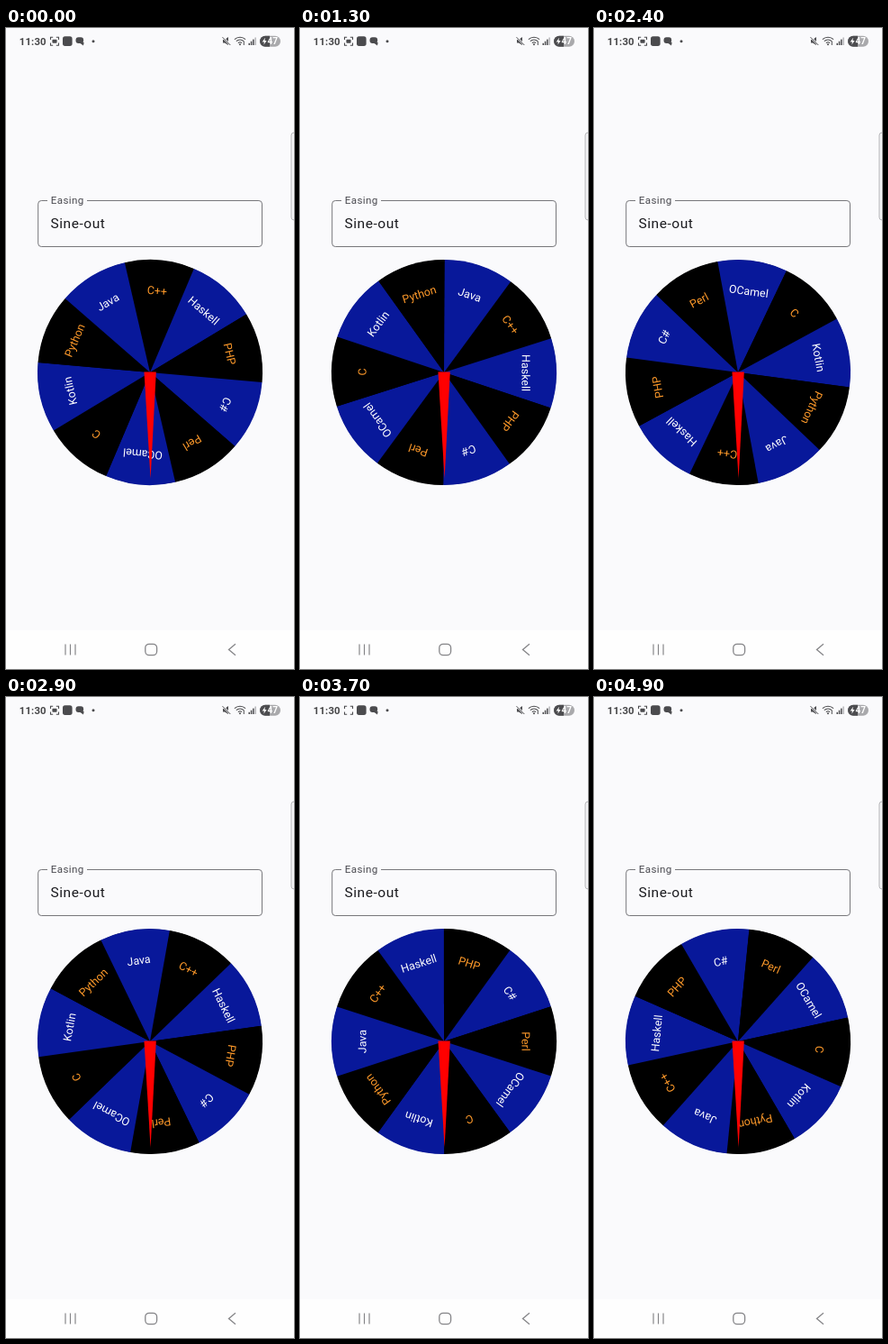
An HTML page with a canvas that plays this animation: 320 by 711 pixels, repeating every 5000 ms.

```html
<!DOCTYPE html>
<html lang="en">
<head>
<meta charset="utf-8">
<title>Spinning wheel</title>
<style>
  html, body { margin: 0; width: 100%; height: 100%; overflow: hidden; background: #fafafc; }
  canvas { display: block; width: 320px; height: 711px; }
</style>
</head>
<body>
<canvas id="stage"></canvas>
<script>
const WIDTH = 320, HEIGHT = 711, LOOP = 5000, STEP = 100;
const SPIN = { start: 447, duration: 5830, from: 5, sweep: 1797 };
const WHEEL = { x: 160, y: 382, radius: 125, labelRadius: 86.5 };
const LABELS = ['C++', 'Haskell', 'PHP', 'C#', 'Perl', 'OCamel', 'C', 'Kotlin', 'Python', 'Java'];
const ICON = '#4b4b4e', NAV = '#858588';

const canvas = document.getElementById('stage');
const ctx = canvas.getContext('2d');
const ratio = window.devicePixelRatio || 1;
canvas.width = WIDTH * ratio;
canvas.height = HEIGHT * ratio;
ctx.scale(ratio, ratio);

const radians = degrees => degrees * Math.PI / 180;

function text(value, x, y, size, color, { weight = 400, spacing = 0, align = 'left' } = {}) {
  ctx.font = `${weight} ${size}px Roboto, sans-serif`;
  ctx.letterSpacing = `${spacing}px`;
  ctx.textAlign = align;
  ctx.fillStyle = color;
  ctx.fillText(value, x, y);
}

function box(x, y, w, h, r) {
  ctx.beginPath();
  ctx.roundRect(x, y, w, h, r);
}

function fill(color) {
  ctx.fillStyle = color;
  ctx.fill();
}

function stroke(color, width = 1) {
  ctx.strokeStyle = color;
  ctx.lineWidth = width;
  ctx.stroke();
}

function path(...points) {
  ctx.beginPath();
  points.forEach(([x, y]) => ctx.lineTo(x, y));
}

function disc(x, y, r, color) {
  ctx.beginPath();
  ctx.arc(x, y, r, 0, 2 * Math.PI);
  fill(color);
}

function drawCaptureIcon(filled) {
  const cx = 54, cy = 14.7;
  for (const sx of [-1, 1]) {
    for (const sy of [-1, 1]) {
      path([cx + sx * 1.8, cy + sy * 4.5], [cx + sx * 4.5, cy + sy * 4.5], [cx + sx * 4.5, cy + sy * 1.8]);
      stroke(ICON, 1.1);
    }
  }
  if (filled) {
    box(cx - 2.6, cy - 2, 5.2, 4, 1);
    fill(ICON);
  }
}

function drawStatusBar(time) {
  text('11:30', 14.8, 18.8, 11.4, '#454547', { weight: 600, spacing: 0.1 });
  const blink = time % 1000;
  drawCaptureIcon(blink < 500 || blink > 800);

  box(63, 9.3, 10.6, 10.6, 2.6);
  fill(ICON);
  box(77.5, 10.3, 8.6, 6.8, 3);
  fill(ICON);
  path([81, 16], [86.6, 16], [86, 19.6]);
  fill(ICON);
  disc(97, 14.8, 1.5, ICON);

  // Muted speaker
  path([241, 13], [243, 13], [247, 10], [247, 19], [243, 16.5], [241, 16.5]);
  fill(ICON);
  path([240.5, 10], [249.5, 19]);
  stroke('#fafafc', 2.2);
  path([240.5, 10.2], [249.3, 19]);
  stroke(ICON, 1);

  // Wi-Fi
  for (const r of [8.6, 5.8, 3]) {
    ctx.beginPath();
    ctx.arc(260, 18.8, r, radians(-135), radians(-45));
    stroke(ICON, 1.1);
  }
  disc(260, 18.2, 1, ICON);
  path([264.3, 14.5], [264.3, 19]);
  stroke(ICON, 1);

  // Signal strength
  for (let i = 0; i < 4; i++) {
    ctx.fillStyle = i < 3 ? ICON : '#b5b5b8';
    ctx.fillRect(269.5 + i * 2.3, 16.8 - i * 2.1, 1.5, 2.2 + i * 2.1);
  }

  // Battery
  ctx.save();
  box(282, 8.7, 23, 12, 6);
  ctx.clip();
  ctx.fillStyle = '#a9a9ac';
  ctx.fillRect(282, 8, 23, 13);
  ctx.fillStyle = '#4c4c4f';
  ctx.fillRect(282, 8, 11, 13);
  ctx.restore();
  path([288, 10.8], [284.7, 15.4], [287, 15.4], [286.3, 18.8], [289.6, 14], [287.4, 14]);
  fill('#fff');
  text('47', 290.6, 18.4, 10, '#fff', { weight: 600 });
}

function drawField() {
  box(35.7, 191.5, 248.8, 51, 3.6);
  stroke('#77777b', 1);
  ctx.fillStyle = '#fafafc';
  ctx.fillRect(46, 188, 44, 7);
  text('Easing', 49.8, 195.2, 11.6, '#4a4a50', { spacing: 0.35 });
  text('Sine-out', 49.5, 222.4, 15.5, '#1b1b1f', { spacing: 0.55 });
}

function wheelAngle(time) {
  const progress = Math.max(0, time - SPIN.start) / SPIN.duration;
  return SPIN.from + SPIN.sweep * Math.sin(progress * Math.PI / 2);
}

function drawWheel(angle) {
  const slice = 360 / LABELS.length;
  const half = radians(slice / 2);
  ctx.save();
  ctx.translate(WHEEL.x, WHEEL.y);
  disc(0, 0, WHEEL.radius - 0.4, '#000');
  ctx.rotate(radians(angle));
  LABELS.forEach((label, i) => {
    const dark = i % 2 === 0;
    ctx.beginPath();
    ctx.moveTo(0, 0);
    ctx.arc(0, 0, WHEEL.radius, -Math.PI / 2 - half, -Math.PI / 2 + half);
    fill(dark ? '#000' : '#08189a');
    text(label, 0, -WHEEL.labelRadius, 12.44, dark ? '#ff9a2a' : '#fff', { align: 'center' });
    ctx.rotate(radians(slice));
  });
  ctx.restore();
}

function drawPointer() {
  path([153.5, 381.5], [166.8, 381.5], [160.6, 500]);
  fill('#f00');
}

function drawEdgePanel() {
  box(317, 116, 10, 97, 3);
  fill('#f4f4f6');
  stroke('#b4b4b7', 1);
}

function drawNavigation() {
  ctx.fillStyle = '#fefefe';
  ctx.fillRect(0, 668, WIDTH, HEIGHT - 668);
  for (const x of [66, 71.5, 77]) {
    path([x, 683.5], [x, 695.5]);
    stroke(NAV, 1.2);
  }
  box(154.8, 683.3, 12.8, 12.4, 4.2);
  stroke(NAV, 1.3);
  path([255, 683.3], [247.5, 689.5], [255, 695.8]);
  stroke(NAV, 1.3);
}

function render(now) {
  const time = Math.floor((now % LOOP) / STEP) * STEP;
  ctx.fillStyle = '#fafafc';
  ctx.fillRect(0, 0, WIDTH, HEIGHT);
  drawStatusBar(time);
  drawEdgePanel();
  drawField();
  drawWheel(wheelAngle(time < 500 ? 0 : time));
  drawPointer();
  drawNavigation();
}

let origin;
function tick(now) {
  origin ??= now;
  render(now - origin);
  requestAnimationFrame(tick);
}
requestAnimationFrame(tick);
</script>
</body>
</html>
```
